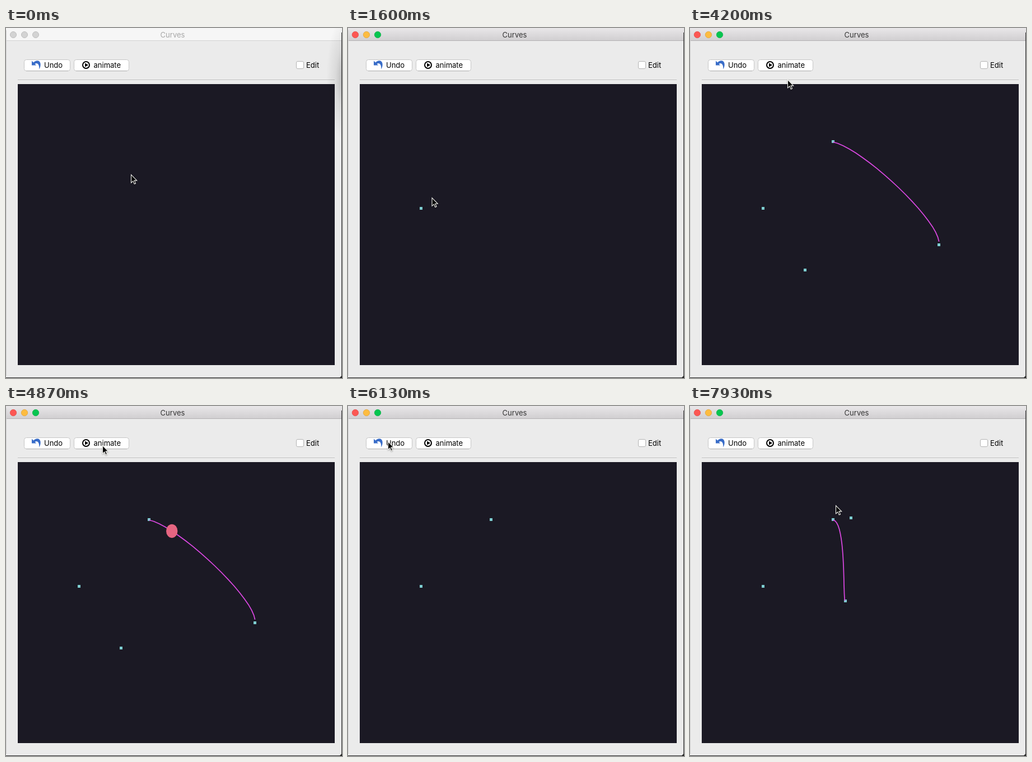
An HTML page that plays this animation: 600 by 624 pixels, repeating every 8 s.

```html
<!DOCTYPE html>
<html lang="en">
<head>
<meta charset="utf-8">
<title>Curves</title>
<style>
  html, body { margin: 0; width: 100%; height: 100%; overflow: hidden; background: #ebebeb; }
  svg { display: block; width: 600px; height: 624px; }
  text { font: 13px Inter, "Open Sans", sans-serif; fill: #000; }
  .title { text-anchor: middle; fill: #333; }
  .button { fill: #fff; stroke: #c6c6c6; }
  .edge { stroke: #adadad; }
  #cursor { filter: drop-shadow(0 1px 1px #0005); }
</style>
</head>
<body>
<svg viewBox="0 0 600 624">
  <defs>
    <linearGradient id="bar" x2="0" y2="1">
      <stop stop-color="#e9e7e9"/><stop offset="1" stop-color="#d1cfd1"/>
    </linearGradient>
    <radialGradient id="shade" gradientUnits="userSpaceOnUse" cx="0" cy="0" r="1"
      gradientTransform="translate(604 90) scale(32 110)">
      <stop stop-color="#000" stop-opacity=".22"/>
      <stop offset=".5" stop-color="#000" stop-opacity=".07"/>
      <stop offset="1" stop-color="#000" stop-opacity="0"/>
    </radialGradient>
  </defs>

  <rect width="600" height="624" fill="#ebebeb"/>

  <g id="idle">
    <rect width="600" height="22" fill="#f6f6f6"/>
    <path d="M0 22.5H600" stroke="#d2d2d2"/>
    <g fill="#d3d3d3" stroke="#bebebe">
      <circle cx="13" cy="12" r="5.5"/><circle cx="33" cy="12" r="5.5"/><circle cx="53" cy="12" r="5.5"/>
    </g>
    <text class="title" x="297.5" y="17" style="fill:#a6a6a6">Curves</text>
  </g>
  <g id="active">
    <rect width="600" height="22" fill="url(#bar)"/>
    <path d="M0 22.5H600" stroke="#b3b1b3"/>
    <g stroke-width=".7">
      <circle cx="13" cy="12" r="5.7" fill="#fc5753" stroke="#df4744"/>
      <circle cx="33" cy="12" r="5.7" fill="#fdbc40" stroke="#de9f34"/>
      <circle cx="53" cy="12" r="5.7" fill="#06c550" stroke="#08ad43"/>
    </g>
    <text class="title" x="297.5" y="17">Curves</text>
  </g>

  <rect class="button" x="32.5" y="56.5" width="82" height="20" rx="4"/>
  <path class="edge" d="M36 76.5H111"/>
  <path d="M46 58.5V66.5H54L51.6 64C55.5 61 60 64.5 59.2 73.5C63.2 67.5 62.5 58.5 56.5 58.2C53.5 58 51 59.3 49 61.4Z" fill="#386cc8"/>
  <text x="68" y="71">Undo</text>

  <rect class="button" x="121.5" y="56.5" width="98" height="20" rx="4"/>
  <path class="edge" d="M125 76.5H216"/>
  <circle cx="143" cy="66" r="6" fill="none" stroke="#000" stroke-width="2"/>
  <path d="M141 62.6V69.4L147 66Z"/>
  <text x="156.5" y="71">animate</text>

  <rect x="518.5" y="59.5" width="13" height="13" rx="2.5" fill="#fff" stroke="#b4b4b4"/>
  <text x="536" y="71">Edit</text>

  <path d="M21 92.5H587" stroke="#bcbcbc"/>
  <path d="M21 93.5H587" stroke="#f5f5f5"/>
  <rect x="21" y="100" width="566" height="501" fill="#1b1924"/>

  <path id="nodes" fill="#7dcdd0"/>
  <g transform="translate(.5 1.2)">
    <path id="curve" fill="none" stroke="#dd48e4" stroke-width="1.7"/>
    <ellipse id="ball" rx="10.2" ry="12.2" fill="#e66581"/>
  </g>

  <rect id="shadow" x="560" width="40" height="204" fill="url(#shade)"/>
  <path d="M.5 4V620" stroke="#d2d2d2"/>
  <path d="M599.5 8V623.5H0" fill="none" stroke="#2a2a2a"/>
  <path d="M600 617V624H593Q599 623 600 617Z" fill="#222"/>
  <path id="cursor" d="M.5.5V14.9L3.9 11.8 6.2 17.1 8.5 16.1 6.2 10.9H10.7Z" fill="#000" stroke="#f4f4f0" stroke-width="1.1"/>
</svg>
<script>
const LOOP = 8000, FRAME = 200 / 3, TRAVEL = 400, ROLL = 1000, STEPS = 20;
const $ = id => document.getElementById(id);

// A place the pointer rests at, when it leaves, and what it clicks there
const stop = (x, y, leave, clicks = {}) => ({ x, y, leave, clicks });
const stops = [
  stop(223, 261, 250),
  stop(130, 321, 1500, { focus: [930], add: [1200] }),
  stop(255, 202, 2330, { add: [2130] }),
  stop(455, 336, 2730),
  stop(444, 386, 3100, { add: [3000] }),
  stop(205, 431, 3860, { add: [3666] }),
  stop(172, 70, 5130, { play: [4666] }),
  stop(71, 63, 6550, { undo: [5750, 6000] }),
  stop(277, 347, 7280, { add: [7130] }),
  stop(287, 199, 7730, { add: [7660] }),
  stop(260, 177, LOOP)
];

const mix = (a, b, u) => a + (b - a) * u;
const smooth = u => u * u * (3 - 2 * u);

function pointer(t) {
  const i = stops.findIndex(s => t < s.leave), to = stops[i];
  if (!i) return [to.x, to.y];
  const from = stops[i - 1];
  const time = Math.min(TRAVEL, (to.leave - from.leave) * .7);
  const u = smooth(Math.min(1, (t - from.leave) / time));
  return [mix(from.x, to.x, u), mix(from.y, to.y, u)];
}

// Replays every click made up to time t
function replay(t) {
  const app = { nodes: [], focused: false, played: Infinity };
  const act = {
    focus: () => { app.focused = true; },
    add: s => app.nodes.push(s),
    undo: () => app.nodes.pop(),
    play: (s, at) => { app.played = at; }
  };
  for (const s of stops)
    for (const name in s.clicks)
      for (const at of s.clicks[name]) if (at <= t) act[name](s, at);
  return app;
}

// Catmull-Rom segment between the two middle nodes
const spline = (p, u) => ['x', 'y'].map(k => {
  const [a, b, c, d] = p.map(n => n[k]), v = 1 - u;
  return mix(b, c, smooth(u)) + ((c - a) * u * v * v - (d - b) * u * u * v) / 2;
});

const trace = p => 'M' + Array.from({ length: STEPS }, (_, i) =>
  spline(p, i / STEPS).map(n => n.toFixed(1))).join('L');

const show = (id, on) => { $(id).style.display = on ? '' : 'none'; };

function draw(now) {
  const t = Math.floor((now % LOOP + 4) / FRAME) * FRAME % LOOP;
  const { nodes, focused, played } = replay(t);
  $('nodes').setAttribute('d', nodes.map(n => `M${n.x - 2} ${n.y - 2}h5v5h-5z`).join(''));

  const full = nodes.length === 4;
  $('curve').setAttribute('d', full ? trace(nodes) : '');

  const u = (t - played) / ROLL;
  const rolling = full && u >= 0 && u < 1;
  show('ball', rolling);
  if (rolling) $('ball').setAttribute('transform', `translate(${spline(nodes, u)})`);

  show('active', focused);
  show('idle', !focused);
  show('shadow', !focused);
  $('cursor').setAttribute('transform', `translate(${pointer(t)})`);
}

function tick() {
  draw(performance.now());
  requestAnimationFrame(tick);
}
tick();
</script>
</body>
</html>
```
